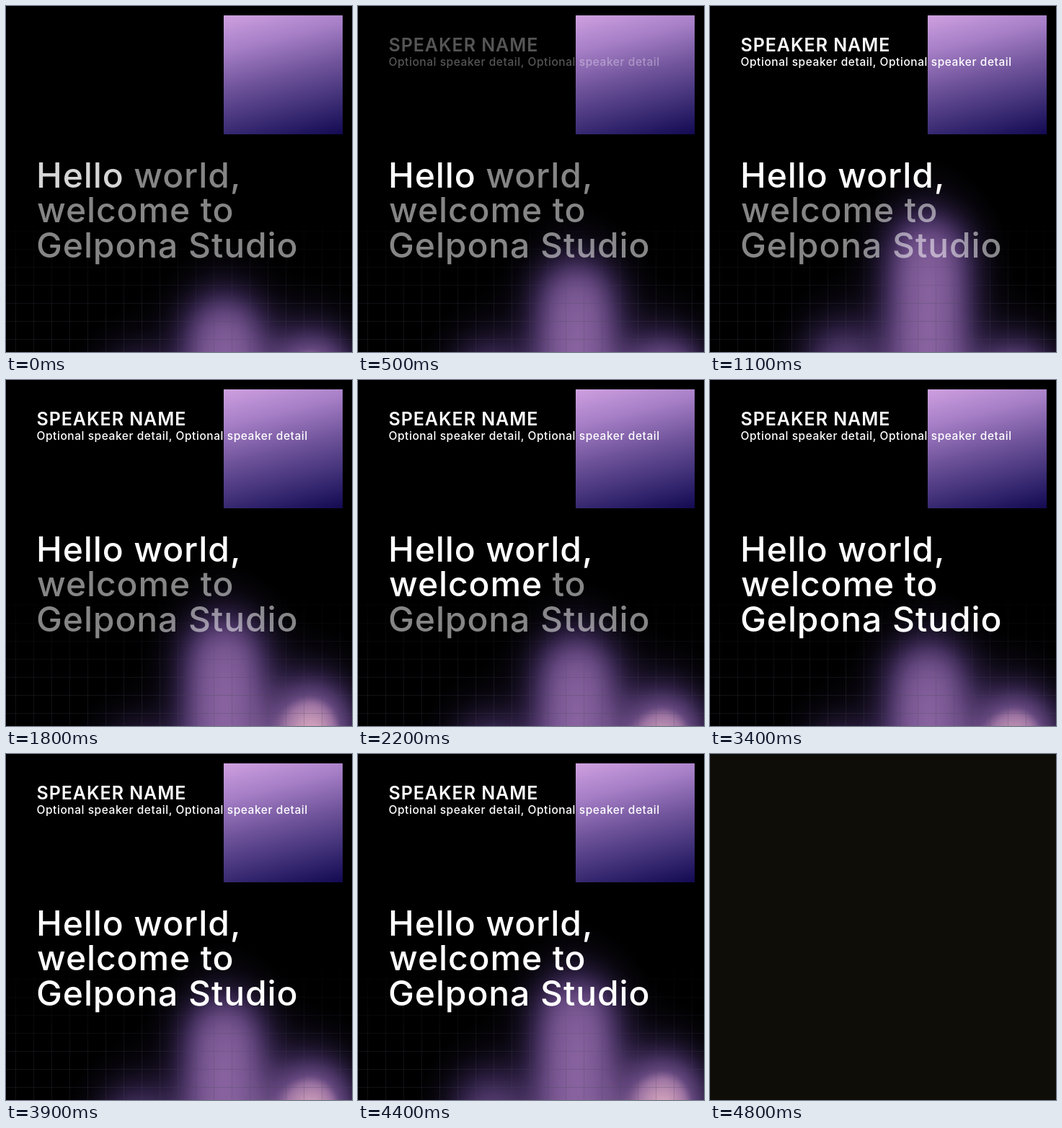
These frames come from a looping animation (480 px wide and 480 px high, 5000 ms). An HTML page with a canvas:

```html
<!DOCTYPE html>
<html lang="en">
<head>
<meta charset="utf-8">
<title>Hello world</title>
<style>
  html, body { margin: 0; width: 100%; height: 100%; overflow: hidden; background: #000; }
  #stage { position: absolute; left: 0; top: 0; width: 480px; height: 480px; overflow: hidden; background: #000; }
  #stage > * { position: absolute; }
  #glow { left: 0; top: 210px; width: 480px; height: 270px; }
  #grid {
    left: 0; top: 287px; width: 480px; height: 193px;
    background:
      linear-gradient(90deg, transparent 13px, #46465a55 13px, #46465a55 14px, transparent 14px) 0 0 / 25px 25px,
      linear-gradient(#46465a55 1px, transparent 1px) 0 0 / 25px 25px;
    -webkit-mask-image: linear-gradient(transparent, #000 70%);
    mask-image: linear-gradient(transparent, #000 70%);
    opacity: .75;
  }
  #tile {
    left: 301.5px; top: 13px; width: 165px; height: 165px;
    background: linear-gradient(166deg, #cfa0e0 0%, #a57ec6 25%, #70549b 50%, #403078 75%, #120a52 100%);
  }
  svg { left: 0; top: 0; fill: #fff; font-family: Inter, "Open Sans", sans-serif; }
  #title { font-size: 48px; font-weight: 500; letter-spacing: .9px; }
  #speaker .name { font-size: 25px; font-weight: 600; letter-spacing: .95px; }
  #speaker .detail { font-size: 15.5px; font-weight: 500; letter-spacing: .56px; }
  #blank { left: 0; top: 0; width: 480px; height: 480px; background: #0e0d08; }
</style>
</head>
<body>
<div id="stage">
  <canvas id="glow" width="160" height="90"></canvas>
  <div id="grid"></div>
  <div id="tile"></div>
  <svg width="480" height="480" viewBox="0 0 480 480">
    <g id="speaker">
      <text class="name" x="42.5" y="63">SPEAKER NAME</text>
      <text class="detail" x="42.5" y="83">Optional speaker detail, Optional speaker detail</text>
    </g>
    <g id="title">
      <text x="42" y="252"><tspan>Hello</tspan> <tspan>world,</tspan></text>
      <text x="43" y="300"><tspan>welcome</tspan> <tspan>to</tspan></text>
      <text x="42" y="349"><tspan>Gelpona</tspan> <tspan>Studio</tspan></text>
    </g>
  </svg>
  <div id="blank"></div>
</div>
<script>
const LOOP = 5000, STEP = 100, END = 4800;
const $ = id => document.getElementById(id);
const clamp = v => Math.max(0, Math.min(1, v));
const lerp = (a, b, k) => a + (b - a) * k;
const mix = (a, b, k) => a.map((v, i) => lerp(v, b[i], k));

// Words light up one after another
const wordStart = [-200, 500, 1850, 2330, 2530, 2950];
const words = [...document.querySelectorAll('#title tspan')];
const DIM = .52;

// Level bars: centre, strength and top edge at each key time
const keyTimes = [0, 1100, 1800, 2700, 3400, 4400, 5000];
const bars = [
  { x: 183, power: .6, tops: [500, 455, 500, 458, 495, 455, 490] },
  { x: 303, power: 1, tops: [419, 307, 347, 407, 381, 327, 410] },
  { x: 424, power: 1.15, tops: [474, 490, 437, 473, 452, 438, 472] }
];
const SPREAD = 40, SOFT = 38, CELL = 3, TOP = 210;

// Colour by field strength, with a warmer core on the right
const levels = [.01, .1, .26, .43, .6, .75, 1];
const ramp = (inner, core) => [[0, 0, 0], [14, 10, 22], [42, 29, 62], [74, 52, 100], [100, 71, 126], inner, core];
const coolRamp = ramp([117, 84, 142], [135, 98, 158]);
const warmRamp = ramp([156, 115, 162], [205, 158, 186]);

function rampColor(stops, f) {
  if (f <= levels[0]) return stops[0];
  for (let i = 1; i < levels.length; i++) {
    if (f < levels[i]) return mix(stops[i - 1], stops[i], (f - levels[i - 1]) / (levels[i] - levels[i - 1]));
  }
  return stops[stops.length - 1];
}

const SHADES = 512, MAX = 1.2;
const shades = stops => Array.from({ length: SHADES }, (_, i) => rampColor(stops, i / (SHADES - 1) * MAX));
const coolShades = shades(coolRamp), warmShades = shades(warmRamp);

const canvas = $('glow'), ctx = canvas.getContext('2d');
const image = ctx.createImageData(canvas.width, canvas.height);
const columns = bars.map(b => Array.from({ length: canvas.width }, (_, i) => {
  const d = (i + .5) * CELL - b.x;
  return b.power * Math.exp(-d * d / (2 * SPREAD * SPREAD));
}));

function barTop(bar, t) {
  let i = 1;
  while (t > keyTimes[i]) i++;
  const k = (t - keyTimes[i - 1]) / (keyTimes[i] - keyTimes[i - 1]);
  return lerp(bar.tops[i - 1], bar.tops[i], (1 - Math.cos(Math.PI * k)) / 2);
}

function drawGlow(t) {
  const tops = bars.map(b => barTop(b, t));
  let p = 0;
  for (let j = 0; j < canvas.height; j++) {
    const y = TOP + (j + .5) * CELL;
    const rows = tops.map(top => 1 / (1 + Math.exp(-1.7 * (y - top) / SOFT)));
    for (let i = 0; i < canvas.width; i++) {
      const x = (i + .5) * CELL;
      const f = columns[0][i] * rows[0] + columns[1][i] * rows[1] + columns[2][i] * rows[2];
      const n = Math.round(clamp(f / MAX) * (SHADES - 1));
      const c = mix(coolShades[n], warmShades[n], clamp((x - 340) / 50));
      image.data[p++] = c[0];
      image.data[p++] = c[1];
      image.data[p++] = c[2];
      image.data[p++] = 255;
    }
  }
  ctx.putImageData(image, 0, 0);
}

function draw(t) {
  $('blank').style.display = t >= END ? 'block' : 'none';
  if (t >= END) return;
  words.forEach((w, i) => {
    w.style.fillOpacity = lerp(DIM, 1, clamp((t - wordStart[i]) / 300));
  });
  $('speaker').style.opacity = clamp((t - 300) / 600);
  drawGlow(t);
}

const start = performance.now();
let last = -1;
function tick() {
  const t = Math.floor((performance.now() - start) % LOOP / STEP) * STEP;
  if (t !== last) draw(last = t);
  requestAnimationFrame(tick);
}
tick();
</script>
</body>
</html>
```
